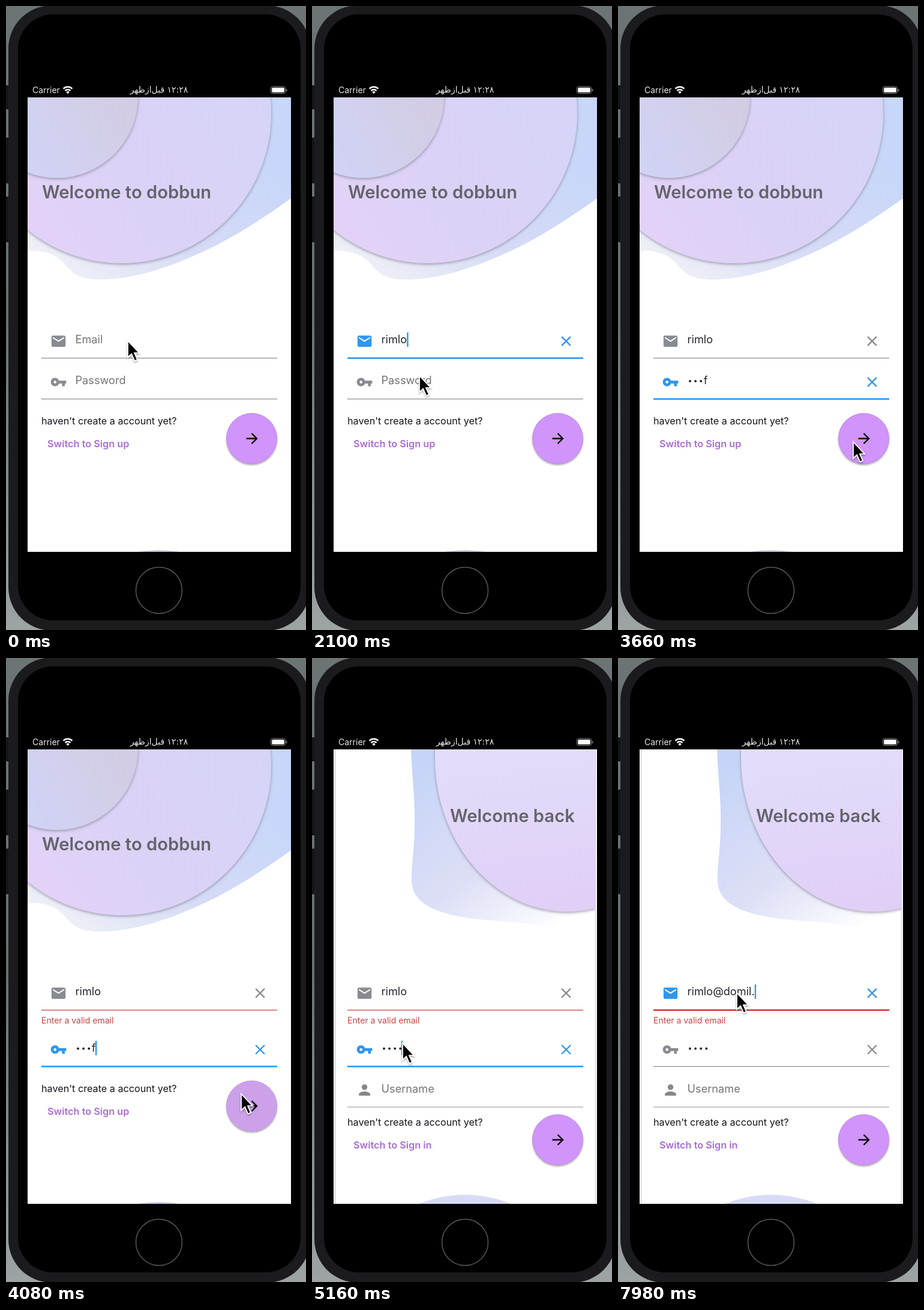
An HTML page that plays this animation: 500 by 1038 pixels, repeating every 8000 ms.

```html
<!DOCTYPE html>
<html lang="en">
<head>
<meta charset="utf-8">
<title>Login form</title>
<style>
  html, body { margin: 0; width: 100%; height: 100%; overflow: hidden; background: #747d7b; }
  svg { display: block; width: 100%; height: 100%; font-family: Inter, Roboto, sans-serif; }
  .title { font-size: 29.2px; font-weight: 600; fill: #65636c; }
  .field { font-size: 18.2px; fill: #26242e; white-space: pre; }
  .hint { fill: #73737a; }
  .note { font-size: 16.2px; fill: #15131c; }
  .link { font-size: 16.3px; font-weight: 600; fill: #aa6bd9; }
  .error { font-size: 14px; fill: #cb4242; }
  .status { font-size: 14px; fill: #e8e8e8; }
  .persian { font-family: "DejaVu Sans", sans-serif; font-weight: 500; direction: rtl; }
</style>
</head>
<body>
<svg viewBox="0 0 500 1038" preserveAspectRatio="none">
  <defs>
    <linearGradient id="backdrop" x1="0" y1="0" x2="0" y2="1">
      <stop offset="0" stop-color="#6c7574"/><stop offset=".5" stop-color="#68706f"/><stop offset="1" stop-color="#9da4a3"/>
    </linearGradient>
    <linearGradient id="wave" x1="1" y1="0" x2="0" y2="1">
      <stop offset=".2" stop-color="#c7d6f9"/><stop offset=".6" stop-color="#d6dbf6"/><stop offset="1" stop-color="#f5f5f7"/>
    </linearGradient>
    <linearGradient id="big" x1="0" y1="1" x2="1" y2=".3">
      <stop offset=".1" stop-color="#e5d2f8"/><stop offset=".5" stop-color="#dbd2f6"/><stop offset="1" stop-color="#d4d5f8"/>
    </linearGradient>
    <linearGradient id="small" x1="0" y1="1" x2="1" y2=".4">
      <stop offset=".1" stop-color="#d0d5fa"/><stop offset=".9" stop-color="#d3cce4"/>
    </linearGradient>
    <linearGradient id="waveUp" x1="0" y1="0" x2=".75" y2="1">
      <stop offset=".1" stop-color="#c6d5f7"/><stop offset=".6" stop-color="#dddff6"/><stop offset="1" stop-color="#fff"/>
    </linearGradient>
    <linearGradient id="bigUp" x1=".3" y1="0" x2=".4" y2="1">
      <stop offset=".5" stop-color="#e3dcfa"/><stop offset="1" stop-color="#e0cff6"/>
    </linearGradient>
    <filter id="shade" x="-10%" y="-10%" width="120%" height="120%">
      <feDropShadow dx="0" dy="1.5" stdDeviation="2.4" flood-color="#77778a" flood-opacity=".75"/>
    </filter>
    <filter id="lift" x="-20%" y="-20%" width="140%" height="150%">
      <feDropShadow dx="0" dy="2" stdDeviation="1.8" flood-opacity=".35"/>
    </filter>
    <clipPath id="screen"><path d="M36 152H475V908H36Z"/></clipPath>
    <clipPath id="inset"><path d="M39 152H472V908H39Z"/></clipPath>
    <path id="mail" d="M20 4H4c-1.1 0-2 .9-2 2v12c0 1.1.9 2 2 2h16c1.1 0 2-.9 2-2V6c0-1.1-.9-2-2-2zm0 4l-8 5-8-5V6l8 5 8-5v2z"/>
    <path id="key" d="M12.65 10C11.83 7.67 9.61 6 7 6c-3.31 0-6 2.69-6 6s2.69 6 6 6c2.61 0 4.83-1.67 5.65-4H17v4h4v-4h2v-4zM7 14c-1.1 0-2-.9-2-2s.9-2 2-2 2 .9 2 2-.9 2-2 2z"/>
    <path id="person" d="M12 12a4 4 0 1 0 0-8 4 4 0 0 0 0 8zm0 2c-2.67 0-8 1.34-8 4v2h16v-2c0-2.66-5.33-4-8-4z"/>
    <path id="clear" d="M5.7 5.7 18.3 18.3M18.3 5.7 5.7 18.3" fill="none" stroke-width="2"/>
  </defs>

  <!-- phone -->
  <rect width="500" height="1038" fill="url(#backdrop)"/>
  <path d="M0 132h5v40H0zM0 219h5v76H0zM0 317h5v76H0z" fill="#141517"/>
  <rect x="4" y="-1" width="503" height="1040" rx="72" fill="#1b1b1d"/>
  <rect x="20" y="14" width="471" height="1008" rx="58"/>
  <circle cx="255" cy="972" r="38.5" fill="none" stroke="#58585a" stroke-width="1.5"/>

  <!-- status bar -->
  <text class="status" x="44" y="145">Carrier</text>
  <g fill="none" stroke="#fff" stroke-width="2.5">
    <path d="M95.6 137.6A10.5 10.5 0 0 1 110.4 137.6M98.5 140.9A6.3 6.3 0 0 1 107.5 140.9"/>
    <path d="M103 146L100.3 143.2A3.8 3.8 0 0 1 105.7 143.2Z" fill="#fff" stroke="none"/>
    <rect x="441.5" y="134" width="24" height="11.5" rx="3" stroke="#8a8a8a" stroke-width="1"/>
    <path d="M467.5 138v4" stroke="#8a8a8a" stroke-width="1.5"/>
    <rect x="443.2" y="135.7" width="20.6" height="8.1" rx="1.6" fill="#fff" stroke="none"/>
  </g>
  <text class="status persian" x="255" y="144" text-anchor="middle">۱۲:۲۸ قبل&zwnj;ازظهر</text>

  <g clip-path="url(#screen)">
    <path d="M36 152H475V908H36Z" fill="#fff"/>
    <circle id="hill" cx="255" cy="1098" r="205"/>

    <g id="signIn">
      <path d="M36 152H475V320C430 352 380 385 330 408C270 436 210 455 155 455C125 455 112 446 100 432C88 416 70 406 36 407Z" fill="url(#wave)"/>
      <circle cx="193" cy="179" r="249" fill="url(#big)" filter="url(#shade)"/>
      <circle cx="85" cy="151" r="135" fill="url(#small)" filter="url(#shade)"/>
      <text class="title" x="60" y="320">Welcome to dobbun</text>
    </g>

    <g id="signUp">
      <g clip-path="url(#inset)">
        <path d="M165 152C166 190 172 230 171 280C171 320 163 360 167 380C175 415 220 428 280 435C350 440 420 446 472 460V152Z" fill="url(#waveUp)"/>
        <ellipse cx="425" cy="165" rx="220" ry="257" fill="url(#bigUp)" filter="url(#shade)"/>
      </g>
      <path d="M38.7 152V908M472.5 152V908" stroke="#d6d6da" stroke-width="1.4"/>
      <text class="title" x="230" y="273">Welcome back</text>
    </g>

    <g id="email">
      <use class="icon" href="#mail" transform="translate(73.5 543.5) scale(1.17)"/>
      <text class="field hint" x="115.5" y="561">Email</text>
      <text class="field value" x="115.5" y="561"></text>
      <use class="clear" href="#clear" transform="translate(409.5 543.5) scale(1.17)"/>
      <rect class="line" x="59" width="393"/>
      <rect class="caret" y="543" width="2.4" height="24" fill="#2f96ee"/>
    </g>
    <text id="error" class="error" x="59" y="608">Enter a valid email</text>

    <g id="password">
      <use class="icon" href="#key" transform="translate(73.5 611.5) scale(1.17)"/>
      <text class="field hint" x="115.5" y="629">Password</text>
      <g class="dots" fill="#26242e"></g>
      <text class="field value" y="629"></text>
      <use class="clear" href="#clear" transform="translate(409.5 611.5) scale(1.17)"/>
      <rect class="line" x="59" width="393"/>
      <rect class="caret" y="611" width="2.4" height="24" fill="#2f96ee"/>
    </g>

    <g id="username">
      <use href="#person" transform="translate(73.5 704.5) scale(1.17)" fill="#84878a"/>
      <text class="field hint" x="115.5" y="723">Username</text>
      <path d="M59 747H452" stroke="#919197" stroke-width="1.2"/>
    </g>

    <g id="footer">
      <text class="note" x="59" y="696">haven't create a account yet?</text>
      <text id="switch" class="link" x="69" y="734"></text>
      <circle cx="409.5" cy="719.5" r="42.3" fill="#d094fb" filter="url(#lift)"/>
      <circle cx="409.5" cy="719.5" r="42" fill="none" stroke="#a874cf" stroke-opacity=".6" stroke-width=".8"/>
      <circle id="ripple" cx="409.5" cy="719.5" r="42" fill="#cbaedd"/>
      <path d="M400.5 719.5H417M409.5 711L418 719.5L409.5 728" fill="none" stroke="#0b0710" stroke-width="2.4"/>
    </g>
  </g>

  <path id="pointer" d="M1 1V28.5L7.2 22.8L12.3 34.4L17 32.3L12 21.2H20Z" stroke="#fff" stroke-width="1.8" filter="url(#lift)"/>
</svg>

<script>
const LOOP = 8000;
const GREY = [137, 139, 146], BLUE = [47, 150, 238], RED = [205, 58, 56];
const EMAIL_KEYS = [700, 960, 1200, 1400, 1620, 7080, 7200, 7320, 7440, 7560, 7740, 7980];
const PASSWORD_KEYS = [2400, 2520, 2640, 2760];
const EMAIL = "rimlo@domil.", PASSWORD = "sdgf";
const SWITCH = 4560;

// time, x, y
const POINTER = [
  [0, 202, 556], [1620, 202, 556], [2040, 178, 614], [2580, 178, 614],
  [3060, 245, 724], [3420, 391, 724], [4140, 391, 724], [4440, 139, 748],
  [4740, 139, 748], [5100, 150, 640], [5280, 150, 640], [5940, 197, 556], [LOOP, 197, 556]
];

const $ = selector => document.querySelector(selector);
const ease = p => p * p * (3 - 2 * p);
const ramp = (t, start, length) => ease(Math.min(1, Math.max(0, (t - start) / length)));
const mix = (a, b, p) => `rgb(${a.map((v, i) => Math.round(v + (b[i] - v) * p))})`;
const set = (el, attrs) => { for (const name in attrs) el.setAttribute(name, attrs[name]); };
const shift = (el, y) => set(el, { transform: `translate(0 ${y})` });

function parts(id) {
  const get = name => $(`#${id} .${name}`);
  return { root: $("#" + id), icon: get("icon"), hint: get("hint"), value: get("value"),
           clear: get("clear"), line: get("line"), caret: get("caret") };
}
const email = parts("email"), password = parts("password");
const dots = $("#password .dots");
dots.innerHTML = [...PASSWORD].map((_, i) => `<circle cx="${120 + i * 9.1}" cy="624" r="2"/>`).join("");

function pointerAt(t) {
  const i = Math.max(1, POINTER.findIndex(p => p[0] > t));
  const [t0, x0, y0] = POINTER[i - 1], [t1, x1, y1] = POINTER[i];
  const p = ramp(t, t0, t1 - t0);
  return `translate(${x0 + (x1 - x0) * p} ${y0 + (y1 - y0) * p})`;
}

// Caret blinks every half second, restarting on each key.
function caretOn(t, start, keys) {
  const last = Math.max(start, ...keys.filter(k => k <= t));
  return (t - last) % 1000 < 500;
}

function drawField(field, focus, filled, y, invalid) {
  const color = mix(GREY, BLUE, focus);
  const height = 1.2 + 1.4 * focus;
  set(field.icon, { fill: color });
  set(field.clear, { stroke: color, opacity: +filled });
  set(field.hint, { opacity: +!filled });
  set(field.line, { y: y - height / 2, height, fill: invalid ? mix(GREY, RED, invalid) : color });
}

function render(t) {
  const emailFocus = ramp(t, 150, 170) * (1 - ramp(t, 2220, 170)) + ramp(t, 6180, 200);
  const passwordFocus = ramp(t, 2220, 170) * (1 - ramp(t, 6180, 200));
  const invalid = ramp(t, 3870, 170);
  const mode = ramp(t, SWITCH, 300);

  const typed = EMAIL_KEYS.filter(k => k <= t).length;
  email.value.textContent = EMAIL.slice(0, typed);
  drawField(email, emailFocus, typed > 0, 585.7, invalid);
  const textWidth = typed ? email.value.getComputedTextLength() : 0;
  const emailCaret = t < 2220 ? t > 180 && caretOn(t, 180, EMAIL_KEYS)
                              : t >= 6660 && caretOn(t, 6660, EMAIL_KEYS);
  set(email.caret, { x: 115.5 + textWidth, opacity: +emailCaret });

  const count = PASSWORD_KEYS.filter(k => k <= t).length;
  const hidden = t < SWITCH ? Math.max(0, count - 1) : count;
  [...dots.children].forEach((dot, i) => set(dot, { opacity: +(i < hidden) }));
  password.value.textContent = PASSWORD.slice(hidden, count);
  set(password.value, { x: 115.5 + hidden * 9.1 });
  drawField(password, passwordFocus, count > 0, 653.7, 0);
  const passwordCaret = t >= 2220 && t < 6180 && caretOn(t, 2220, PASSWORD_KEYS);
  set(password.caret, { x: count ? 112.5 + count * 9.1 : 115.5, opacity: +passwordCaret });

  shift(password.root, 25.8 * invalid);
  shift($("#footer"), 25.8 * invalid + 56.2 * mode);
  set($("#error"), { opacity: invalid });
  set($("#username"), { opacity: mode });
  set($("#signIn"), { opacity: 1 - mode });
  set($("#signUp"), { opacity: mode });
  shift($("#hill"), 12 * (1 - mode));
  set($("#hill"), { fill: mix([200, 199, 233], [215, 219, 245], mode) });
  $("#switch").textContent = t < SWITCH ? "Switch to Sign up" : "Switch to Sign in";

  const press = ramp(t, 3780, 200);
  set($("#ripple"), { r: 42 * press, opacity: .55 * press * (1 - ramp(t, 4080, 260)) });
  set($("#pointer"), { transform: pointerAt(t) });
}

function tick(now) {
  render(now % LOOP);
  requestAnimationFrame(tick);
}
render(0);
requestAnimationFrame(tick);
</script>
</body>
</html>
```
